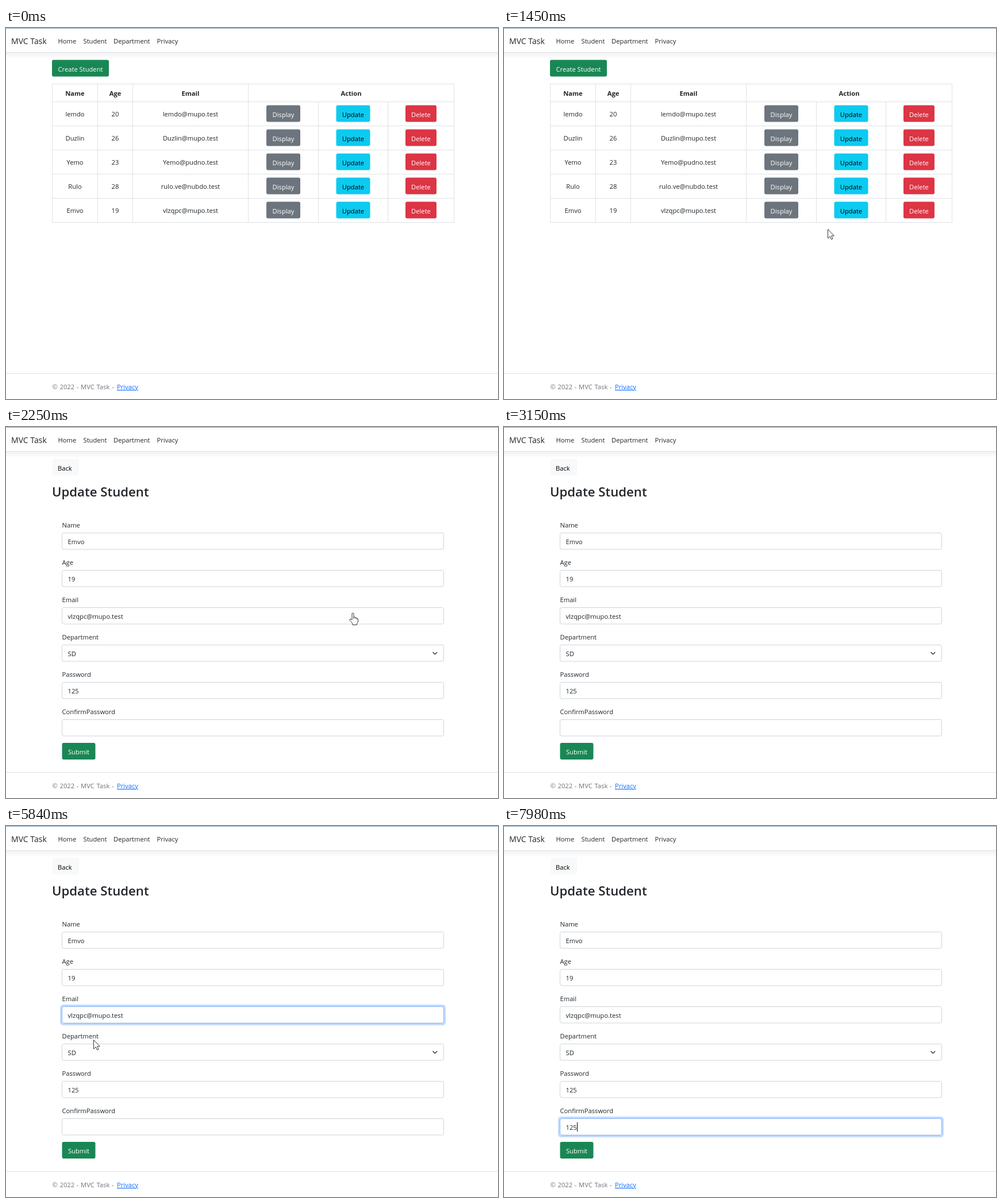
Animation of 856x646 px, one loop 8 s. Source, as an HTML page:

```html
<!DOCTYPE html>
<html lang="en">
<head>
<meta charset="utf-8">
<title>MVC Task</title>
<style>
  html, body { margin: 0; width: 100%; height: 100%; overflow: hidden; background: #fff; }
  svg { display: block; }
  text { font: 11.2px "Open Sans", "Noto Sans", sans-serif; fill: #212529; white-space: pre; }
  .mid { text-anchor: middle; }
  .bold { font-weight: 700; }
  .brand { font-size: 14px; }
  .title { font-size: 22.2px; font-weight: 600; }
  .muted { fill: #6c757d; word-spacing: .8px; }
  .link { fill: #0d6efd; text-decoration: underline; }
  .light { fill: #fff; font-weight: 500; }
  .dark { fill: #000; }
  .line { stroke: #dee2e6; fill: none; }
  .field { fill: #fff; stroke: #ced4da; }
  .ring { fill: none; stroke: #0d6efd; stroke-opacity: .25; stroke-width: 3; }
  .edge { fill: none; stroke: #86b7fe; }
  .cursor { fill: #fff; stroke: #1d2030; stroke-width: .9; stroke-linejoin: round; }
</style>
</head>
<body>
<svg id="stage" width="856" height="646" viewBox="0 0 856 646"></svg>
<script>
const DURATION = 8000;
const COLS = [80.5, 159.5, 220.5, 421.5, 543.5, 664.5, 779.5];
const ROW_TOP = 128, ROW_H = 42, FIELD_TOP = 184.5, FIELD_STEP = 65;
const EMAIL = 'vlzqpc@mupo.test';
const students = [
  ['lemdo', 20, 'lemdo@mupo.test'],
  ['Duzlin', 26, 'Duzlin@mupo.test'],
  ['Yemo', 23, 'Yemo@pudno.test'],
  ['Rulo', 28, 'rulo.ve@nubdo.test'],
  ['Emvo', 19, EMAIL]
];
const fields = [['Name', 'Emvo'], ['Age', 19], ['Email', EMAIL],
  ['Department', 'SD'], ['Password', 125], ['ConfirmPassword', '']];

// [start time, shape, x, y]
const pointer = [
  [0, ''],
  [680, 'arrow', 354, 430], [750, 'arrow', 378, 408], [820, 'arrow', 404, 388],
  [890, 'arrow', 430, 373], [970, 'arrow', 478, 365], [1050, 'arrow', 516, 380],
  [1370, 'arrow', 538, 366], [1450, 'arrow', 563, 350], [1530, 'arrow', 586, 335],
  [1610, 'hand', 594, 326], [1690, 'hand', 597, 323],
  [2720, ''], [2850, 'arrow', 170, 352], [3090, 'arrow', 166, 349], [3150, ''],
  [5720, 'arrow', 156, 354], [5800, 'arrow', 152, 372], [5890, 'arrow', 146, 392],
  [5980, 'arrow', 140, 410], [6070, 'arrow', 136, 426], [6150, 'arrow', 134, 438],
  [6240, ''], [6800, 'arrow', 148, 515], [6890, '']
];
// [start time, value]
const buttonFocus = [[0, 0], [1930, .55], [2020, 1]];
const emailFocus = [[0, 0], [4390, .55], [4540, .85], [4610, 1], [7300, .4], [7360, 0]];
const confirmFocus = [[0, 0], [7300, .6], [7360, 1]];
const emailCaret = [[0, 0], [4130, 1], [4610, 0], [5130, 1], [5720, 0], [6240, 1], [6650, 0]];
const typed = [[0, 0], [7620, 1], [7770, 2], [7980, 3]];

const text = (x, y, s, cls = '') => `<text x="${x}" y="${y}" class="${cls}">${s}</text>`;
const rect = (x, y, w, h, extra) => `<rect x="${x}" y="${y}" width="${w}" height="${h}" ${extra}/>`;
const path = (d, extra = 'class="line"') => `<path d="${d}" ${extra}/>`;
const button = (x, y, w, label, fill, cls = 'light', id = '') =>
  rect(x, y, w, 29, `rx="3" fill="${fill}" id="${id}"`) +
  text(x + w / 2, y + 20, label, 'mid ' + cls);
const middle = i => (COLS[i] + COLS[i + 1]) / 2;

function frameParts() {
  const links = [['Home', 90.5], ['Student', 134.5], ['Department', 187], ['Privacy', 262.5]];
  return `<linearGradient id="shade" x2="0" y2="1"><stop stop-opacity=".05"/>
    <stop offset="1" stop-opacity="0"/></linearGradient>` +
    rect(0, 43, 856, 11, 'fill="url(#shade)"') +
    path('M0 42.5H856M0 601.5H856') + path('M0 .5H856', 'stroke="#7f9fb8"') +
    text(9, 28, 'MVC Task', 'brand') +
    links.map(([s, x]) => text(x, 27, s)).join('') +
    text(80.5, 629, '© 2022 - MVC Task - ', 'muted') + text(193, 629, 'Privacy', 'link');
}

function listPage() {
  const bottom = ROW_TOP + ROW_H * 5;
  let out = button(80, 55.5, 99, 'Create Student', '#198754');
  let grid = 'M80 97.5H780';
  for (let i = 0; i < 6; i++) grid += `M80 ${ROW_TOP + ROW_H * i + .5}H780`;
  COLS.forEach((x, i) => grid += `M${x} ${i == 4 || i == 5 ? ROW_TOP : 97}V${bottom}`);
  out += path(grid) + rect(81, bottom - ROW_H + 1, 698, ROW_H - 1, 'id="hover" fill="#ececec"');
  ['Name', 'Age', 'Email'].forEach((s, i) => out += text(middle(i), 118, s, 'mid bold'));
  out += text(600.5, 118, 'Action', 'mid bold');
  students.forEach((row, r) => {
    const y = ROW_TOP + ROW_H * r, last = r == 4;
    row.forEach((s, i) => out += text(middle(i), y + 26.4, s, 'mid'));
    out += button(453, y + 6.5, 59, 'Display', '#6c757d') +
      button(574.5, y + 6.5, 59, 'Update', '#0dcaf0', 'dark', last ? 'target' : '') +
      button(695, y + 6.5, 54, 'Delete', '#dc3545');
  });
  return out + rect(573, bottom - 37, 62, 32,
    'id="buttonRing" rx="4" fill="none" stroke="#0baccc" stroke-opacity=".5" stroke-width="3"');
}

function focusRing(id, i) {
  const y = FIELD_TOP + FIELD_STEP * i;
  return `<g id="${id}">${rect(95.5, y - 2, 668, 33, 'rx="4" class="ring"')}` +
    `${rect(97.5, y, 664, 29, 'rx="3" class="edge"')}</g>`;
}

function formPage() {
  let out = rect(81, 55.5, 46, 29, 'rx="3" fill="#f8f9fa"') + text(90, 75.5, 'Back', 'dark') +
    text(80, 121, 'Update Student', 'title');
  fields.forEach(([label, value], i) => {
    const y = FIELD_TOP + FIELD_STEP * i;
    out += text(97.5, y - 10, label) + rect(97.5, y, 664, 28.5, 'rx="3" class="field"') +
      `<text x="107.5" y="${y + 19.5}" id="field${i}">${value}</text>`;
  });
  return out + path('M742.5 392l3.8 3.8 3.8-3.8', 'fill="none" stroke="#343a40" stroke-width="1.5"') +
    button(97.5, 550, 58, 'Submit', '#198754') +
    focusRing('emailRing', 2) + focusRing('confirmRing', 5) +
    rect(141, 321, 1, 16, 'id="emailCaret"') + rect(108, 516, 1, 16, 'id="confirmCaret"');
}

const arrow = path('M.5 .5V16.2L4.2 12.8 6.6 18 9 17 6.7 11.8H11.3Z', 'class="cursor" id="arrow"');
const hand = path('M5 13V2.3a1.5 1.5 0 0 1 3 0V8q2.9-.7 3.3 1.1 2-.4 2.2 1.2 2-.1 2 1.7V16' +
  'L13.5 19.3V21.5H6V19.3L1 13.2q-.6-1.6.8-2 1.4-.1 3.2 1.8ZM8 8v3M11.3 9.1v2.3M13.5 10.3v1.5',
  'class="cursor" id="hand"');

const stage = document.getElementById('stage');
stage.innerHTML = frameParts() + `<g id="list">${listPage()}</g><g id="form">${formPage()}</g>` + arrow + hand;

const el = id => document.getElementById(id);
const show = (id, on) => el(id).setAttribute('display', on ? 'inline' : 'none');
const fade = (id, amount) => el(id).setAttribute('opacity', amount);
const keyAt = (keys, t) => keys.findLast(k => k[0] <= t);
const valueAt = (keys, t) => keyAt(keys, t)[1];

function draw(t) {
  show('list', t < 2250);
  show('form', t >= 2250);
  show('hover', t >= 1530);
  el('target').setAttribute('fill', t >= 1610 ? '#31d2f2' : '#0dcaf0');
  fade('buttonRing', valueAt(buttonFocus, t));

  fade('emailRing', valueAt(emailFocus, t));
  fade('confirmRing', valueAt(confirmFocus, t));
  show('emailCaret', valueAt(emailCaret, t));
  const count = valueAt(typed, t);
  el('field5').textContent = '125'.slice(0, count);
  el('confirmCaret').setAttribute('x', Math.floor(108 + 6.4 * count));
  show('confirmCaret', t >= 7230);

  const [, shape, x, y] = keyAt(pointer, t);
  for (const id of ['arrow', 'hand']) show(id, id == shape);
  if (shape) el(shape).setAttribute('transform', `translate(${x} ${y})`);
}

const start = performance.now();
function tick() {
  draw((performance.now() - start) % DURATION);
  requestAnimationFrame(tick);
}
tick();
</script>
</body>
</html>
```
